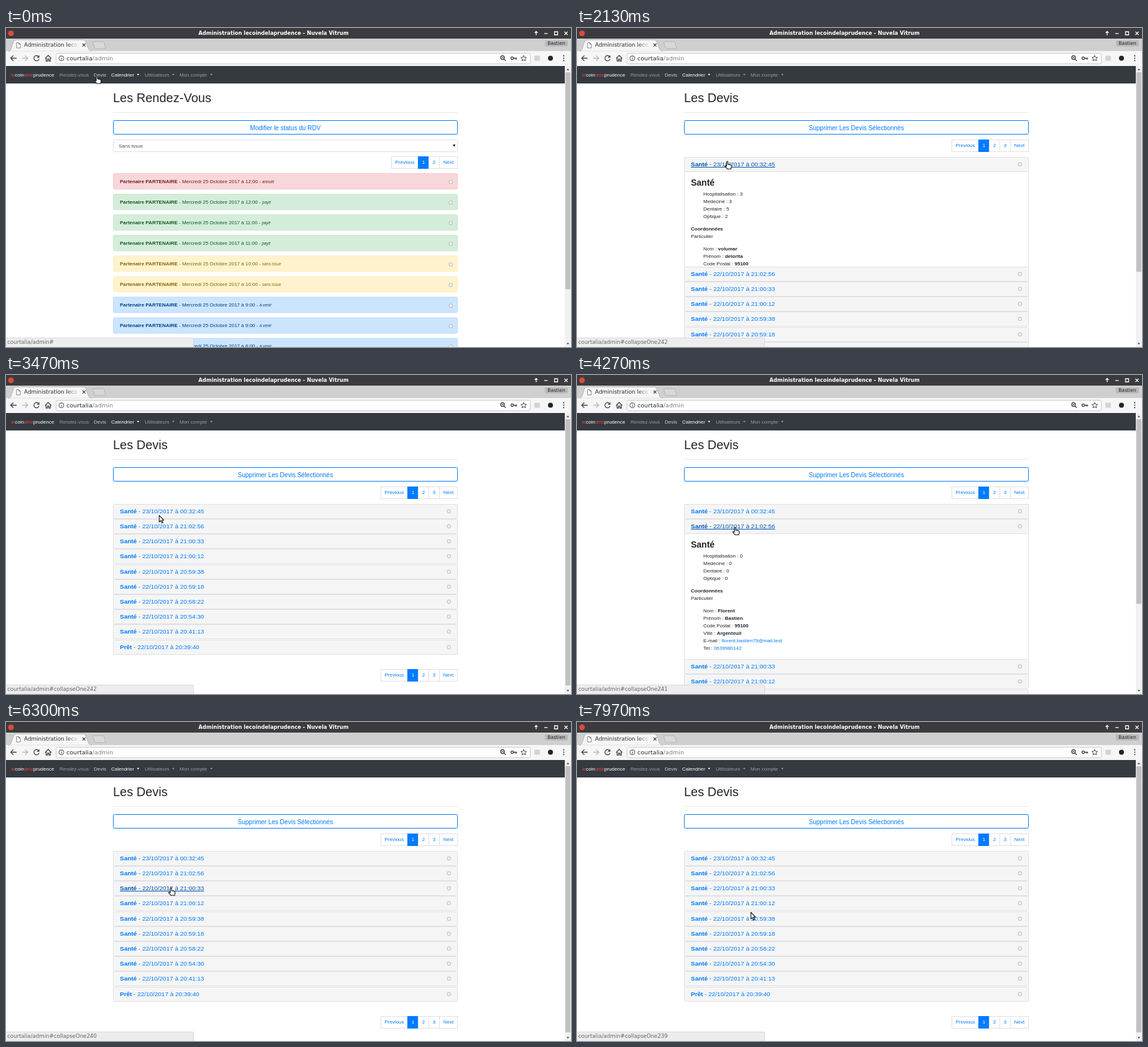
An HTML page that plays this animation: 908 by 512 pixels, repeating every 8000 ms.

```html
<!DOCTYPE html>
<html lang="fr">
<head>
<meta charset="utf-8">
<title>Administration</title>
<style>
html, body { margin: 0; width: 100%; height: 100%; overflow: hidden; background: #fff }
svg { display: block; font-family: "Liberation Sans", Arial, sans-serif; font-size: 8px; fill: #212529 }
.ui { font-family: "DejaVu Sans", sans-serif }
.b { font-weight: bold }
.link { fill: #007bff }
.icon { fill: none; stroke: #444; stroke-width: 1.3 }
</style>
</head>
<body>
<svg id="stage" width="908" height="512" viewBox="0 0 908 512"></svg>
<script>
const LOOP = 8000, BODY = 208, ROW = 24.18, TOP = 206.9, COLLAPSE = 600, SWAP = 550, FADE = 300;
const BLUE = '#007bff', LINE = '#dfdfe6', PALE = '#f6f6f6', GREY = '#999c9f';

const rect = (x, y, w, h, fill, more = '') =>
  `<rect x="${x}" y="${y}" width="${w}" height="${h}" fill="${fill}" ${more}/>`;
const text = (x, y, s, more = '') => `<text x="${x}" y="${y}" ${more}>${s}</text>`;
const path = (d, more = '') => `<path d="${d}" ${more}/>`;
const bold = s => `<tspan class="b">${s}</tspan>`;
const link = s => `<tspan class="link">${s}</tspan>`;
const box = (x, y) => rect(x - 2.5, y - 2.5, 5, 5, '#f4f4f4', 'stroke="#aaa" stroke-width=".8" rx=".8"');

function chrome() {
  const caret = x => path(`M${x - 2} 73.8h4l-2 2.4z`, `fill="${x < 220 ? '#fff' : GREY}"`);
  const nav = (x, s, fill = GREY) => text(x, 78, s, `fill="${fill}"`);
  const red = s => `<tspan fill="#e0403c">${s}</tspan>`;
  return rect(0, 0, 908, 17, '#3b3b3f') +
    '<circle cx="8" cy="8.5" r="4.6" fill="#dd4b39"/>' +
    text(430, 11.3, 'Administration lecoindelaprudence - Nuvela Vitrum',
      'class="ui b" font-size="8.33" fill="#fff" text-anchor="middle"') +
    path('M852 11.5v-6m-2.4 2.4l2.4-2.4 2.4 2.4M865 8.8h5.5M881.5 6h5v5h-5zM897.5 6l5 5m0-5l-5 5',
      'fill="none" stroke="#fff" stroke-width="1.3"') +
    rect(0, 17, 908, 20, '#cfcfcf') +
    rect(0, 37, 908, 24, PALE) +
    path('M4 37.3q3 0 4-3l4-12.3q1-3 4-3h108q3 0 4 3l5 12.3q1 3 5 3z', `fill="${PALE}" stroke="#aaa" stroke-width=".8"`) +
    rect(5, 36.8, 132, 1, PALE) +
    path('M141 22h14q2 0 2.6 1.5l2.4 7.5q.6 2-1.4 2h-13.5q-2 0-2.6-1.5l-3-7.5q-.6-2 1.5-2z',
      'fill="#d8d8d8" stroke="#aaa" stroke-width=".8"') +
    path('M17 23.5h3.5l2.5 2.5v6h-6zM20.5 23.5v2.5h2.5', 'fill="#fff" stroke="#666" stroke-width=".8"') +
    '<linearGradient id="fade" gradientUnits="userSpaceOnUse" x1="98" x2="117"><stop stop-color="#2c2c2c"/>' +
    '<stop offset="1" stop-color="#2c2c2c" stop-opacity="0"/></linearGradient>' +
    text(29, 30.4, 'Administration leco', 'class="ui" font-size="8.85" fill="url(#fade)"') +
    path('M123 25l4.6 4.6m0-4.6l-4.6 4.6', 'class="icon"') +
    rect(866, 20, 37, 9.5, '#b8b8b8', 'rx="2"') +
    text(884.5, 27.3, 'Bastien', 'class="ui" font-size="7.6" text-anchor="middle"') +
    path('M17 48.5h-9.5m4.3-4.3l-4.3 4.3 4.3 4.3', 'class="icon"') +
    path('M26 48.5h9m-4.2-4.2l4.2 4.2-4.2 4.2', 'class="icon" opacity=".35"') +
    path('M52.3 45.8a4.2 4.2 0 1 0 .8 3.8M53 44v3h-3', 'class="icon"') +
    path('M62.8 49l5-5 5 5M64.5 48v5h2.3v-3h2.2v3h2.3v-5', 'class="icon"') +
    rect(80.5, 40.5, 762, 17, '#fff', 'rx="2" stroke="#c8c8c8"') +
    '<circle cx="89" cy="48.6" r="4" class="icon" style="stroke-width:1"/>' +
    path('M89 48v3M89 46v1', 'class="icon" style="stroke-width:1"') +
    text(97, 52, 'courtalia<tspan fill="#7c7c7c">/admin</tspan>', 'class="ui" font-size="9.55"') +
    '<circle cx="798" cy="47.5" r="3" class="icon"/><circle cx="813.5" cy="48.5" r="2" class="icon"/>' +
    path('M800.2 49.8l3 3M796.5 47.5h3M815.5 48.5h5v2M818.5 48.5v2', 'class="icon"') +
    path('M832 44l1.3 3 3.3.3-2.5 2.2.8 3.2-2.9-1.7-2.9 1.7.8-3.2-2.5-2.2 3.3-.3z', 'class="icon" style="stroke-width:1"') +
    rect(849, 44.5, 9, 8, '#d4d4d4', 'rx="1"') +
    '<circle cx="875" cy="48.5" r="4"/>' +
    [44.7, 48.5, 52.3].map(y => `<circle cx="896.3" cy="${y}" r="1.1" fill="#444"/>`).join('') +
    rect(0, 61, 898, 28, '#343a40') +
    text(8, 78, `${red('le')}coin${red('dela')}prudence`, 'fill="#fff"') +
    nav(86, 'Rendez-vous') + nav(141, 'Devis', '#ccced0') + nav(169, 'Calendrier', '#fff') +
    nav(223, 'Utilisateurs') + nav(279, 'Mon compte') + [212.3, 268.8, 330].map(caret).join('') +
    rect(898, 61, 10, 451, '#f1f1f1') +
    path('M900.8 67.8l2.2-2.8 2.2 2.8zM900.8 505.5l2.2 2.8 2.2-2.8z', 'fill="#505050"') +
    rect(899, 71, 8, 400, '#c1c1c1', 'id="thumb"');
}

function heading(title, button) {
  return text(172, 119, title, 'font-size="20"') +
    rect(172, 135, 554, 1, '#e9e9ec') +
    rect(172.5, 148.5, 553, 22, 'none', `rx="2" stroke="${BLUE}"`) +
    text(449, 164, button, 'class="link" font-size="10" text-anchor="middle"');
}

function pager(y, pages) {
  const edges = [725.5, 696.5];
  for (let i = 0; i < pages; i++) edges.push(edges.at(-1) - 17);
  edges.push(edges.at(-1) - 43);
  edges.reverse();
  return edges.slice(0, -1).map((x, i) => {
    const w = edges[i + 1] - x, on = i === 1;
    const label = i === 0 ? 'Previous' : i > pages ? 'Next' : i;
    return rect(x, y, w, 19, on ? BLUE : '#fff', `stroke="${on ? BLUE : LINE}"`) +
      text(x + w / 2, y + 11.5, label, `fill="${on ? '#fff' : BLUE}" text-anchor="middle"`);
  }).join('');
}

// Alert looks: label, fill, border, text
const LOOKS = {
  a: ['annulé', '#f8d7da', '#f5c6cb', '#721c24'],
  p: ['payé', '#d4edda', '#c3e6cb', '#155724'],
  s: ['sans issue', '#fff3cd', '#ffeeba', '#856404'],
  v: ['à venir', '#cce5ff', '#b8daff', '#004085']
};

function meetings() {
  const hours = [12, 12, 11, 11, 10, 10, 9, 9, 8];
  const alerts = [...'apppssvvv'].map((k, i) => {
    const [label, fill, edge, ink] = LOOKS[k], y = 233.6 + 33.05 * i;
    return rect(172.5, y, 553, 25, fill, `rx="2" stroke="${edge}" stroke-width=".9"`) +
      text(183, y + 15.2, `${bold('Partenaire PARTENAIRE')} - Mercredi 25 Octobre 2017 à ${hours[i]}:00 - ` +
        `<tspan font-size="6.4" font-style="italic">${label}</tspan>`, `fill="${ink}"`) +
      box(714.7, y + 13.6);
  });
  return heading('Les Rendez-Vous', 'Modifier le status du RDV') +
    rect(172.5, 179.5, 553, 19, '#fff', `rx="2" stroke="${LINE}"`) +
    text(181, 192, 'Sans issue', 'fill="#495057"') +
    path('M718 187h4.4l-2.2 4z') +
    pager(206.5, 2) + alerts.join('');
}

const people = [
  { marks: [3, 3, 5, 2], last: 'volumar', first: 'delorita', mail: 'bastien@mail.test' },
  { marks: [0, 0, 0, 0], last: 'Florent', first: 'Bastien', mail: 'florent.bastien79@mail.test' }
];

function details({ marks, last, first, mail }) {
  const fields = ['Nom : ' + bold(last), 'Prénom : ' + bold(first), 'Code Postal : ' + bold('95100'),
    'Ville : ' + bold('Argenteuil'), 'E-mail : ' + link(mail), 'Tel : ' + link('0639980142')];
  return rect(172.5, -5, 553, BODY + 10, '#fff', `stroke="${LINE}"`) +
    text(183, 22.3, 'Santé', 'class="b" font-size="14"') +
    ['Hospitalisation', 'Medecine', 'Dentaire', 'Optique']
      .map((s, i) => text(203, 37.7 + 12 * i, `${s} : ${marks[i]}`)).join('') +
    text(183, 93.7, bold('Coordonnées')) + text(183, 105.7, 'Particulier') +
    fields.map((s, i) => text(203, 125.7 + 12 * i, s)).join('');
}

const times = ['00:32:45', '21:02:56', '21:00:33', '21:00:12', '20:59:38', '20:59:18', '20:58:22', '20:54:30', '20:41:13', '20:39:40'];

function quotes() {
  const cards = times.map((time, i) => `<g id="card${i}">` +
    rect(172.5, .5, 553, 23, '#f5f5f5', `rx="1" stroke="${LINE}"`) +
    text(183, 15, `${bold(i < 9 ? 'Santé' : 'Prêt')} - ${i ? 22 : 23}/10/2017 à ${time}`, `id="link${i}" class="link" font-size="9.95"`) +
    box(711.8, 11.8) +
    (i < 3 ? `<svg id="body${i}" y="24" width="908" height="0" overflow="hidden">${details(people[Math.min(i, 1)])}</svg>` : '') +
    '</g>');
  return heading('Les Devis', 'Supprimer Les Devis Sélectionnés') + pager(179.5, 3) + cards.join('') +
    `<g id="foot">${pager(472, 3)}</g>`;
}

const stage = document.getElementById('stage');
stage.innerHTML = `<g id="meetings">${meetings()}</g><g id="quotes">${quotes()}</g>` + chrome() +
  `<g id="status">${rect(-1, 497.5, 302.5, 16, '#ededed', 'stroke="#d4d4d4" stroke-width=".8" rx="1.5"')}` +
  text(2, 507.3, '', 'id="url" class="ui" font-size="8.6" fill="#666"') + '</g>' +
  path('', 'id="cursor" fill="#fff" stroke="#111" stroke-width="1.1" stroke-linejoin="round"');

const $ = id => document.getElementById(id);
const set = (id, attrs) => { for (const k in attrs) $(id).setAttribute(k, attrs[k]); };
const clamp = v => Math.max(0, Math.min(1, v));
const smooth = u => u * u * (3 - 2 * u);

// CSS "ease": cubic-bezier(.25, .1, .25, 1)
function ease(p) {
  const bez = (u, a, b) => 3 * u * (1 - u) ** 2 * a + 3 * u * u * (1 - u) * b + u ** 3;
  let lo = 0, hi = 1;
  for (let i = 0; i < 20; i++) {
    const mid = (lo + hi) / 2;
    if (bez(mid, .25, .25) < p) lo = mid; else hi = mid;
  }
  return bez(lo, .1, 1);
}

const toggles = [[1870, 2873], [3811, 5010], [6350, 7300]]; // open, close
const moves = [[0, 146, 77], [870, 146, 77], [1500, 239.5, 213.7], [1900, 241.5, 214], [3250, 241.5, 214], [3780, 254, 244.3],
  [5620, 254, 244.3], [6250, 265, 266], [6950, 265, 266], [7110, 266.5, 270.8], [7200, 266.5, 270.8],
  [7290, 267, 267], [7400, 267, 267], [7950, 279.5, 305.5], [LOOP, 279.5, 305.5]];
const statuses = [[0, 950, ''], [1700, 3570, 'collapseOne242'], [3570, 6000, 'collapseOne241'],
  [6000, 7080, 'collapseOne240'], [7290, 7750, 'collapseOne240'], [7750, LOOP, 'collapseOne239']];
const HAND = 'M-1 1q0-1 1-1t1 1v3.6l4 .8q2 .4 1.8 2.2l-.8 4.6h-6l-3.5-4q-.5-1.3 1-1.1l1.5 1z';
const ARROW = 'M0 0v10.5l2.4-2.2 1.8 3.9 1.8-.8-1.8-3.8h3.3z';

function pointer(t) {
  const i = moves.findIndex(m => m[0] > t), [t0, x0, y0] = moves[i - 1], [t1, x1, y1] = moves[i];
  const u = smooth((t - t0) / (t1 - t0));
  return [x0 + (x1 - x0) * u, y0 + (y1 - y0) * u];
}

function draw(t) {
  set('meetings', { opacity: clamp((SWAP - t) / FADE) });
  set('quotes', { opacity: clamp((t - SWAP) / FADE) });

  const [x, y] = pointer(t);
  let shift = 0, over = y < 82 && x < 161;
  times.forEach((_, i) => {
    const top = Math.round(TOP + ROW * i + shift), dy = y - top - 11.6;
    const hit = t > SWAP && x > 183 && x < 319 && dy > -6 && dy < 3.4;
    over ||= hit;
    set('card' + i, { transform: `translate(0 ${top})` });
    set('link' + i, { 'text-decoration': hit ? 'underline' : 'none', style: hit ? 'fill:#0056b3' : '' });
    if (i < 3) {
      const [open, close] = toggles[i].map(s => ease(clamp((t - s) / COLLAPSE)));
      const h = BODY * (open - close);
      set('body' + i, { height: h });
      shift += h;
    }
  });
  set('foot', { transform: `translate(0 ${Math.round(shift) + .5})` });
  set('thumb', { height: 431 * 451 / (t < SWAP ? 558 : 455 + shift) });
  set('cursor', { d: over ? HAND : ARROW, transform: `translate(${x} ${y})` });

  const now = statuses.findLast(s => s[0] <= t);
  set('status', { opacity: clamp(1 - (t - now[1]) / 180) });
  $('url').textContent = 'courtalia/admin#' + now[2];
}

function tick() {
  draw(performance.now() % LOOP);
  requestAnimationFrame(tick);
}
tick();
</script>
</body>
</html>
```
